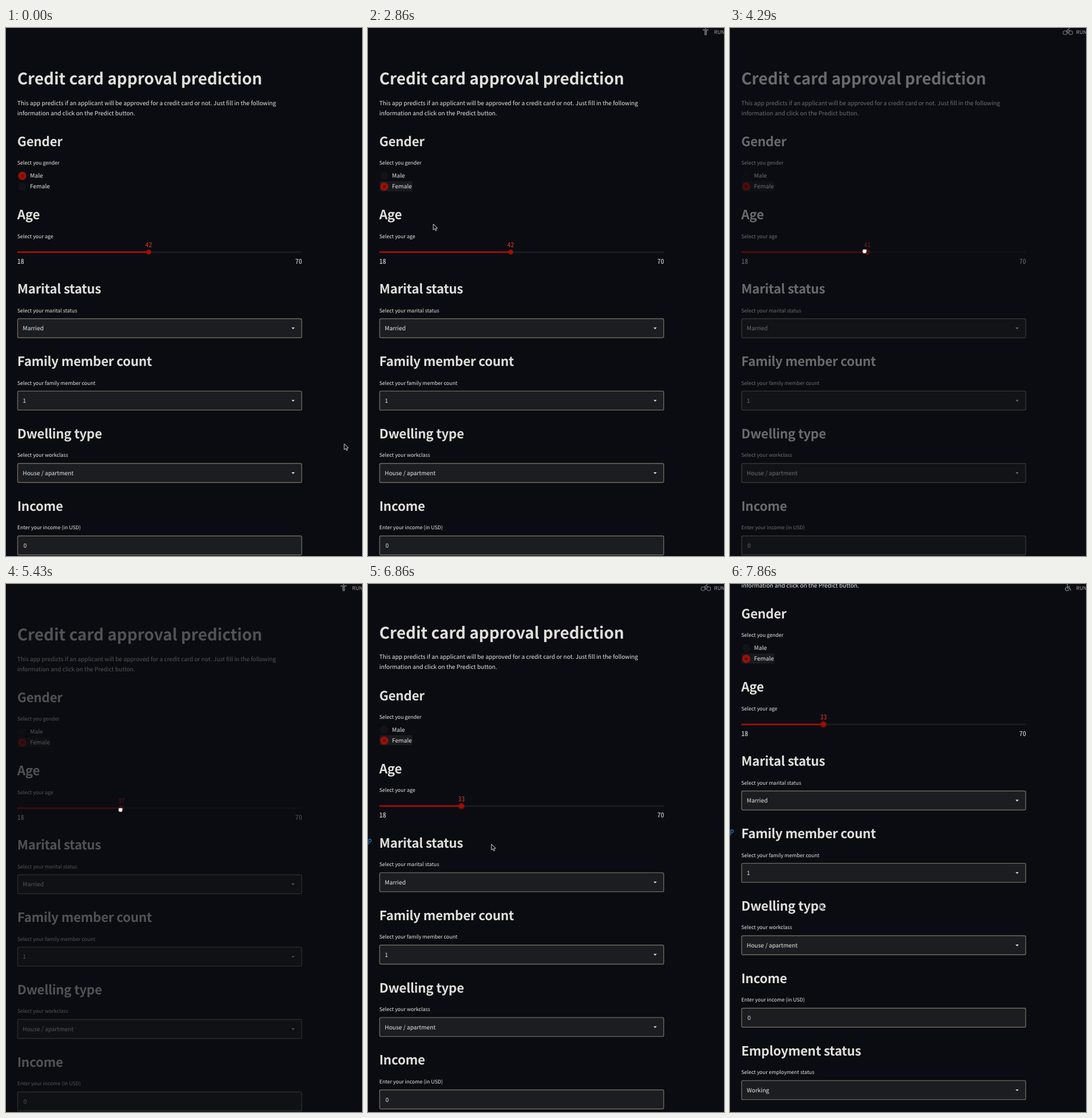
These frames come from a looping animation (600 by 889 pixels, 8000 ms). An HTML page:

```html
<!DOCTYPE html>
<html lang="en">
<head>
<meta charset="utf-8">
<title>Credit card approval prediction</title>
<style>
html, body { margin: 0; width: 100%; height: 100%; overflow: hidden; background: #0b0c11; }
svg { display: block; width: 600px; height: 889px; }
text {
  font-family: "Noto Sans CJK JP", "Noto Sans CJK SC", "Noto Sans CJK", sans-serif;
  fill: #eae9e5; text-rendering: geometricPrecision; white-space: pre;
}
.title { font-size: 26.86px; font-weight: 700; fill: #e0dfdb; }
.heading { font-size: 21.6px; font-weight: 700; letter-spacing: -.012em; fill: #e0dfdb; }
.body { font-size: 9.77px; }
.label { font-size: 8.55px; }
.mono { font: 11.46px "Noto Sans Mono CJK JP", "Noto Sans Mono CJK SC", monospace; }
.box { fill: #1c1d20; stroke: #6b675b; stroke-width: 1.4; }
.red { fill: #9c1008; }
.line { fill: none; stroke-linecap: round; stroke-linejoin: round; }
#value { fill: #d8372d; text-anchor: middle; }
</style>
</head>
<body>
<svg viewBox="0 0 600 889">
  <g id="page"></g>
  <g id="link" class="line" stroke="#2f6fbe" stroke-width="1.3">
    <g transform="rotate(-45)">
      <path d="M-1 -2.2H-3.2a2.2 2.2 0 0 0 0 4.4H-1M1 -2.2H3.2a2.2 2.2 0 0 1 0 4.4H1M-2 0H2"/>
    </g>
  </g>
  <g id="status">
    <g id="icon" class="line" stroke="#77777a" stroke-width="1.6"></g>
    <text class="label" x="583.5" y="9.6" style="fill:#a8a59e">RUNNING...</text>
  </g>
  <g id="cursor"></g>
</svg>
<script>
const $ = id => document.getElementById(id);
const LOOP = 8000, STEPS_PER_MS = 7 / 1000;
const SECTION_TOP = 438.5, SECTION_PITCH = 121.9;

const text = (cls, x, y, content, extra = '') =>
  `<text class="${cls}" x="${x}" y="${y}" ${extra}>${content}</text>`;

const radio = (id, y, name) => `
  <circle cx="27.4" cy="${y}" r="6.9" fill="#121316"/>
  <g id="${id}"><circle class="red" cx="27.4" cy="${y}" r="6.9"/>
  <circle cx="27.4" cy="${y}" r="2.3" fill="#450b0a"/></g>
  ${text('body', 40.5, y + 3.4, name)}`;

const sections = [
  ['Marital status', 'Select your marital status', 'Married'],
  ['Family member count', 'Select your family member count', '1'],
  ['Dwelling type', 'Select your workclass', 'House / apartment'],
  ['Income', 'Enter your income (in USD)', '0'],
  ['Employment status', 'Select your employment status', 'Working'],
];

function section([heading, label, value], i) {
  const isInput = heading === 'Income';
  return `<g transform="translate(0 ${SECTION_TOP + i * SECTION_PITCH})">
    ${text('heading', 19, 8.6, heading)}
    ${text('label', 19, 40.2, label)}
    <rect class="box" x="19.6" y="51" width="478.8" height="32" rx="2.2"/>
    ${text('body', isInput ? 29.5 : 28.3, 70.8, value)}
    ${isInput ? '' : '<path d="M481.2 65.8h5.4l-2.7 2.9z" fill="#eae9e5"/>'}
  </g>`;
}

$('page').innerHTML = `
  ${text('title', 19, 95.3, 'Credit card approval prediction')}
  ${text('body', 19, 129.6, 'This app predicts if an applicant will be approved for a credit card or not. Just fill in the following')}
  ${text('body', 19, 146.5, 'information and click on the Predict button.')}
  ${text('heading', 19, 199, 'Gender')}
  ${text('label', 19, 230.3, 'Select you gender')}
  <rect id="focus" x="19.5" y="258" width="55.5" height="17" rx="2.5" fill="#181a1e"/>
  ${radio('male', 249, 'Male')}
  ${radio('female', 267, 'Female')}
  ${text('heading', 19, 322, 'Age')}
  ${text('label', 19, 353.8, 'Select your age')}
  <rect x="19" y="376" width="480" height="2.7" rx="1.3" fill="#1a1b1e"/>
  <rect id="filled" class="red" x="19" y="376" height="2.7" rx="1.3"/>
  <circle id="glow" class="red" cy="377.3" r="6" opacity=".4"/>
  <circle id="thumb" class="red" cy="377.3" r="4.1"/>
  <text id="value" class="mono" y="369.4"></text>
  ${text('mono', 19, 396.6, '18')}
  ${text('mono', 499, 396.6, '70', 'text-anchor="end"')}
  ${sections.map(section).join('')}`;

const head = (x, y) => `<circle cx="${x}" cy="${y}" r="1.1" fill="#77777a" stroke="none"/>`;
const swim = `${head(574, 3.4)}<path d="M565 1l4-1 4 5-6 1M562 8q2-1.6 4 0t4 0 4 0 3 0M562 11q2-1.6 4 0t4 0 4 0 3 0" stroke-width="1.2"/>`;
const stand = `${head(569, .6)}<path d="M564.5 3.2h9M568 3.5v8M570.2 3.5v8"/>`;
const bike = `<circle cx="564.5" cy="8" r="3.2" stroke-width="1.1"/><circle cx="574.3" cy="8" r="3.2" stroke-width="1.1"/>
  ${head(571.4, .6)}<path d="M569.5 9.5v-3l-2.2-2 2.4-2 2 2h2.2" stroke-width="1.2"/>`;
const run = `${head(571.6, .8)}<path d="M565.5 5.3l1.5-2.1 3-.4-1.4 4.6 2.4 1.6v2.6M568.5 7.5l-.8 1.9-3.2-.5M570.5 3.4l1.2 1.8 2 .4" stroke-width="1.5"/>`;
const wheelchair = `${head(568.6, .8)}<path d="M568.6 2.8v4h3.6l2 3.6M569 4.5h3.5M566.7 5.6a3 3 0 1 0 4.2 4" stroke-width="1.5"/>`;
const activities = [run, wheelchair, stand, bike, swim, run, bike, stand, swim];

const cursors = {
  arrow: '<path d="M0 0V10l2.4-2.1 1.7 3.5 1.6-.8-1.6-3.3 3.1-.3z" fill="#0b0c11" stroke="#e6e6e6" stroke-width=".9"/>',
  hand: '<path d="M-1 .6q.9-1 1.7 0V4l3.8 1q.9.5.6 2l-.8 3H0L-3 6q0-1.4 2 .2z" fill="#fff" stroke="#111" stroke-width=".6"/>',
  grab: '<path d="M-3.4-2.2q1-1.3 1.8-.4 1-1.2 1.8-.2 1-1 1.8.2 1.5-.6 1.6.8v2L2.4 3.8h-4.6L-4 .6q-.2-1.2 1-.8z" fill="#fff" stroke="#111" stroke-width=".6"/>',
};

// Keys are [step, value, ...]; steps are a seventh of a second.
const pointerPath = [[1, 570, 700], [4, 330, 300], [6, 180, 95], [8, 236, 672], [10, 110, 340],
  [12, 32, 274], [13, 26.5, 267.5], [17, 26.5, 267.5], [20, 110, 330], [24, 239.5, 374],
  [27, 239.5, 374], [38, 193, 380], [41, 158, 381], [42, 158, 381], [46, 208, 438],
  [53, 208, 438], [55, 152, 538]];
const agePath = [[27, 42], [38, 37], [41, 33]];
const fadePath = [[24, 1], [26, .9], [28, .69], [30, .45], [31, .33], [43, .33], [45, 1]];
const scrollPath = [[47, 0], [48, 3.4], [49, 32], [50, 70.2], [51, 103], [52, 124], [53, 136], [54, 141]];

function at(path, step) {
  const next = path.findIndex(key => key[0] > step);
  if (next < 0) return path[path.length - 1].slice(1);
  if (next === 0) return path[0].slice(1);
  const a = path[next - 1], b = path[next], p = (step - a[0]) / (b[0] - a[0]);
  return a.slice(1).map((v, i) => v + (b[i + 1] - v) * p);
}

const show = (id, visible) => $(id).setAttribute('visibility', visible ? 'visible' : 'hidden');

function pointerShape(step) {
  if (step >= 24 && step < 42) return 'grab';
  return step >= 12 && step < 19 ? 'hand' : 'arrow';
}

let shown = -1;
function draw() {
  const step = Math.floor((performance.now() % LOOP + 6) * STEPS_PER_MS) % 56;
  requestAnimationFrame(draw);
  if (step === shown) return;
  shown = step;

  const [scroll] = at(scrollPath, step);
  $('page').setAttribute('transform', `translate(0 ${-scroll})`);
  $('page').setAttribute('opacity', at(fadePath, step)[0]);

  const clicked = step >= 17;
  show('male', !clicked);
  show('female', clicked);
  show('focus', clicked);
  show('status', clicked);
  $('icon').innerHTML = activities[step % activities.length];

  const age = Math.round(at(agePath, step)[0]);
  const x = 19 + 480 * (age - 18) / 52;
  $('filled').setAttribute('width', x - 19);
  for (const id of ['thumb', 'glow']) $(id).setAttribute('cx', x);
  show('glow', step >= 24);
  $('value').setAttribute('x', x);
  $('value').textContent = age;

  const hovered = step < 52 ? 0 : 1;
  show('link', step >= 46);
  $('link').setAttribute('transform', `translate(1 ${SECTION_TOP + hovered * SECTION_PITCH - 1 - scroll})`);

  $('cursor').innerHTML = cursors[pointerShape(step)];
  $('cursor').setAttribute('transform', `translate(${at(pointerPath, step)})`);
}
draw();
</script>
</body>
</html>
```
